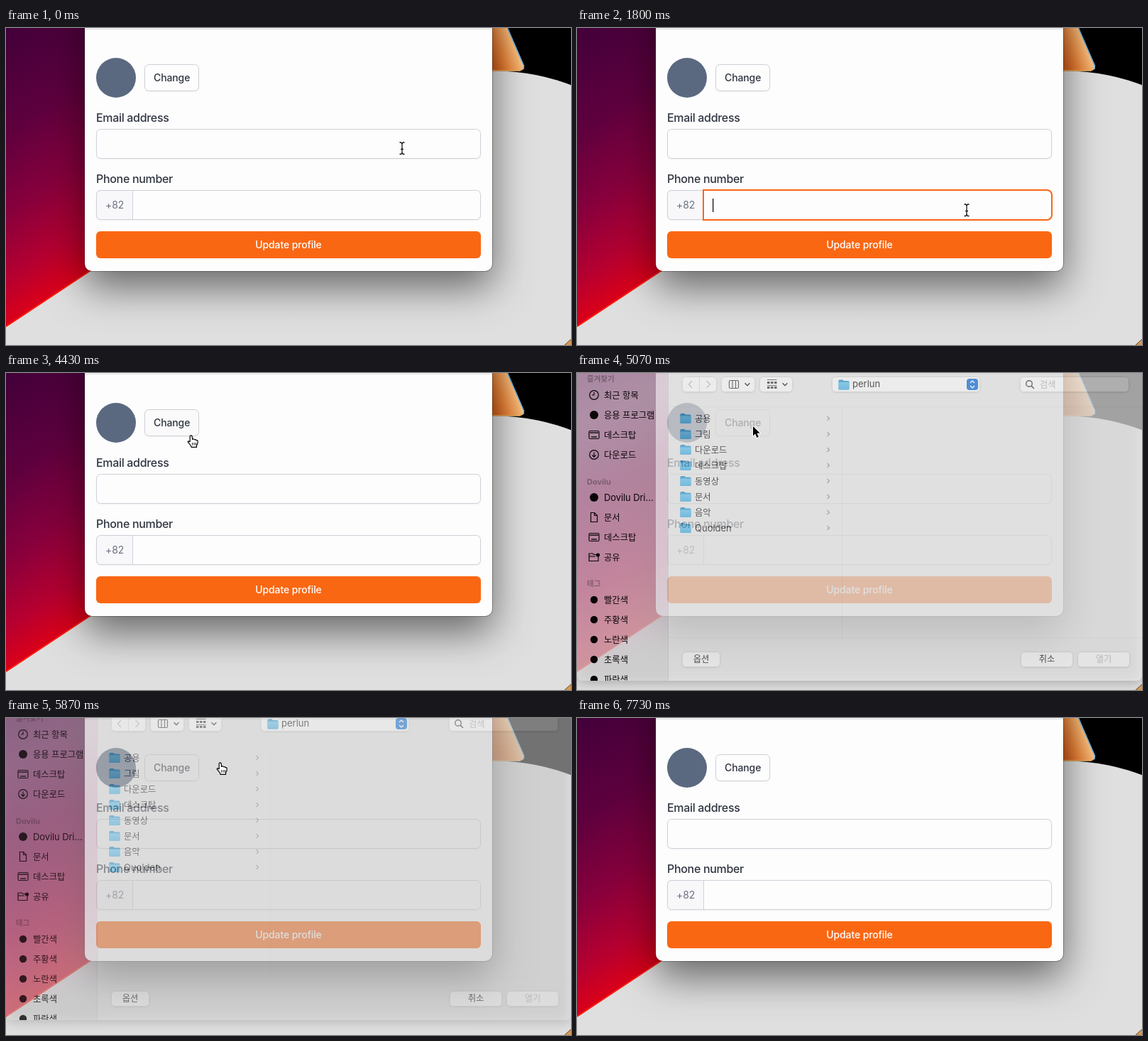
These frames come from a looping animation (796x446 px, 7760 ms). An HTML page with a canvas:

```html
<!DOCTYPE html>
<html lang="ko">
<head>
<meta charset="utf-8">
<title>Profile form</title>
<style>
html, body { margin: 0; width: 100%; height: 100%; overflow: hidden; background: #dfdfdf; }
canvas { display: block; width: 796px; height: 446px; }
</style>
</head>
<body>
<canvas id="stage" width="796" height="446"></canvas>
<script>
const W = 796, H = 446, LOOP = 7760;
const FONT = 'Inter, "Noto Sans CJK KR", "Noto Sans CJK", sans-serif';
const ORANGE = '#fa6713', BLUE = '#1478d8', INK = '#262626';
const screen = document.getElementById('stage').getContext('2d');
const layer = document.createElement('canvas');
layer.width = W; layer.height = H;
const sheet = layer.getContext('2d');
let g = screen;

const clamp = v => Math.max(0, Math.min(1, v));
const ease = v => v * v * (3 - 2 * v);
const during = (t, a, b) => t >= a && t < b;

function fill(color) { g.fillStyle = color; g.fill(); }
function stroke(color, width = 1) { g.strokeStyle = color; g.lineWidth = width; g.stroke(); }
function rect(x, y, w, h, color) { g.fillStyle = color; g.fillRect(x, y, w, h); }
function round(x, y, w, h, r) { g.beginPath(); g.roundRect(x, y, w, h, r); }
function poly(points, close) {
  g.beginPath();
  points.forEach(([x, y]) => g.lineTo(x, y));
  if (close) g.closePath();
}
function line(color, width, ...points) { poly(points); stroke(color, width); }
function disc(x, y, r, color) { g.beginPath(); g.arc(x, y, r, 0, 7); fill(color); }
function ring(x, y, r, color, width = 1.2) { g.beginPath(); g.arc(x, y, r, 0, 7); stroke(color, width); }
function gradient(x0, y0, x1, y1, stops) {
  const gr = g.createLinearGradient(x0, y0, x1, y1);
  stops.forEach(([at, c]) => gr.addColorStop(at, c));
  return gr;
}
function text(str, x, y, size, color, { weight = 400, space = 0, align = 'left' } = {}) {
  g.font = `${weight} ${size}px ${FONT}`;
  g.letterSpacing = space + 'px';
  g.textAlign = align;
  g.textBaseline = 'alphabetic';
  g.fillStyle = color;
  g.fillText(str, x, y);
}
function shadow(color, blur, y) { g.shadowColor = color; g.shadowBlur = blur; g.shadowOffsetY = y; }
function noShadow() { shadow('transparent', 0, 0); }

function wallpaper() {
  rect(0, 0, W, H, '#dfdfdf');
  poly([[0, 0], [640, 0], [0, 420]], true);
  fill(gradient(0, 0, 194, 293, [[0, '#42003a'], [.35, '#5e003e'], [.62, '#86003c'],
    [.85, '#b60030'], [1, '#dc0018']]));
  line('#ff1c10', 2, [0, 420], [130, 334]);

  rect(600, 0, 196, 120, '#000');
  disc(690, 355, 294.5, '#dfdfdf');
  g.beginPath();
  g.moveTo(670, 0); g.lineTo(706, 0); g.lineTo(729, 53);
  g.quadraticCurveTo(731, 60, 724, 60);
  g.lineTo(670, 60);
  g.closePath();
  fill(gradient(684, 40, 725, 24, [[0, '#d9641f'], [.35, '#ec873c'], [.75, '#f7b673'], [1, '#fff0cf']]));
  line('#6fb9e8', 1.5, [706.5, 0], [729.5, 53], [729, 58]);
  line('#f3b565', 1.5, [680, 60], [725, 60]);
  poly([[796, 438], [796, 446], [787, 446]], true);
  fill('#d99a4e');
  line('#5b4632', 1, [796, 438], [787, 446]);
}

function field(x, y, w, h, r, color = '#fdfdfd') {
  shadow('rgba(0,0,0,.07)', 2, 1);
  round(x + .5, y + .5, w - 1, h - 1, r);
  fill(color);
  noShadow();
  stroke('#cfd0d9');
}

function focusRing(x, y, w, h, r) {
  round(x + 1, y + 1, w - 2, h - 2, r);
  fill('#fdfdfd');
  stroke(ORANGE, 2);
}

function caret(x, y, age) {
  if (age % 1000 < 500) rect(x, y, 1.3, 19, '#111');
}

function form(t, hover) {
  shadow('rgba(0,0,0,.55)', 56, 22);
  round(111, -60, 574, 402, 10);
  fill('#fdfdfd');
  noShadow();
  round(110.5, -60, 575, 402.5, 10.5);
  stroke('rgba(0,0,0,.28)');
  rect(111, 1, 574, 1, '#d9d9dc');

  disc(155, 70, 28, '#5a6980');
  field(195, 51, 77, 38, 6, hover === 'change' ? '#fafafb' : '#fdfdfd');
  text('Change', 208, 75, 14, '#2f3541', { weight: 500, space: -.12 });

  const label = { weight: 500, space: -.32 };
  text('Email address', 127, 132, 16, '#2f3541', label);
  field(127, 142, 542, 42, 6);
  if (during(t, 500, 1600)) {
    focusRing(126, 141, 544, 44, 7);
    caret(139.5, 154, t - 500);
  }

  text('Phone number', 127, 218, 16, '#2f3541', label);
  field(127, 228, 542, 42, 6);
  round(127.5, 228.5, 51, 41, [6, 0, 0, 6]);
  fill('#f8f8fa');
  stroke('#cfd0d9');
  text('+82', 140, 254, 14, '#6b7080', { space: -.1 });
  if (during(t, 1600, 2900)) {
    focusRing(177, 227, 493, 44, [0, 7, 7, 0]);
    caret(191, 240, t - 1600);
  }

  if (during(t, 2900, 3700)) {
    round(124, 283, 548, 44, 8);
    stroke(ORANGE, 2);
  }
  round(127, 286, 542, 38, 6);
  fill(hover === 'update' ? '#e64b0d' : ORANGE);
  text('Update profile', 398, 310, 14, '#fff', { weight: 500, space: -.12, align: 'center' });
}

function folder(x, y) {
  round(x - 7.5, y - 7, 7, 5, 1.5);
  fill('#2f93c9');
  round(x - 7.5, y - 5.5, 15, 12.5, 1.5);
  fill('#3aa0d6');
  round(x - 7.5, y - 3.5, 15, 10.5, 1.5);
  fill(gradient(0, y - 4, 0, y + 7, [[0, '#70cbf4'], [1, '#4fb5e8']]));
}

function pill(x, y, w, h = 22) {
  shadow('rgba(0,0,0,.16)', 2, .5);
  round(x, y, w, h, 5.5);
  fill('#fff');
  noShadow();
  round(x + .5, y + .5, w - 1, h - 1, 5);
  stroke('#dcdcdc');
}

function chevron(x, y, dx, dy, color, width = 1.3) {
  line(color, width, [x - dx - dy, y - dy - dx], [x + dx * .6, y + dy * .6],
    dx ? [x - dx, y + dx] : [x - dy * -1, y - dy]);
}
function right(x, y, s, color, w = 1.2) { line(color, w, [x - s / 2, y - s], [x + s / 2, y], [x - s / 2, y + s]); }
function down(x, y, s, color, w = 1.6) { line(color, w, [x - s, y - s / 2], [x, y + s / 2], [x + s, y - s / 2]); }

const icons = {
  clock(x, y, c) { ring(x, y, 6.3, c); line(c, 1.2, [x, y - 4], [x, y], [x - 3, y]); },
  dot(x, y, c) { disc(x, y, 6, c); },
  desk(x, y, c) {
    round(x - 7, y - 5.5, 14, 11, 1.5); stroke(c, 1.2);
    line(c, 1.4, [x - 6, y - 3], [x + 6, y - 3]);
    line(c, 1.4, [x - 4, y + 3], [x + 4, y + 3]);
  },
  get(x, y, c) {
    ring(x, y, 6.3, c);
    line(c, 1.2, [x, y - 3.5], [x, y + 3]);
    line(c, 1.2, [x - 2.6, y + .5], [x, y + 3.2], [x + 2.6, y + .5]);
  },
  page(x, y, c) {
    poly([[x - 4.5, y - 6.5], [x + .5, y - 6.5], [x + 4.5, y - 2.5], [x + 4.5, y + 6.5], [x - 4.5, y + 6.5]], true);
    stroke(c, 1.2);
    line(c, 1.1, [x + .5, y - 6.5], [x + .5, y - 2.5], [x + 4.5, y - 2.5]);
  },
  share(x, y, c) {
    poly([[x - 7, y - 5], [x - 2, y - 5], [x, y - 3.5], [x + 6, y - 3.5], [x + 6, y + 5.5], [x - 7, y + 5.5]], true);
    stroke(c, 1.2);
    line(c, 1.1, [x - 7, y - 1], [x + 2, y - 1]);
    disc(x + 5.5, y - 3, 2.6, c);
  }
};

const places = [
  ['최근 항목', 44, 'clock'], ['응용 프로그램', 72, 'dot'], ['데스크탑', 100, 'desk'], ['다운로드', 128, 'get'],
  ['Dovilu Dri…', 188, 'dot'], ['문서', 216, 'page'], ['데스크탑', 244, 'desk'], ['공유', 272, 'share']
];
const tags = [['빨간색', '#e8261d'], ['주황색', '#e0721c'], ['노란색', '#eda532'], ['초록색', '#3cb02a'], ['파란색', '#1672e0']];
const files = ['공용', '그림', '다운로드', '데스크탑', '동영상', '문서', '음악', 'Quolden'];

function sideItems(dark) {
  const head = { weight: 700 }, tone = dark ? 'rgba(0,0,0,.3)' : '#9c7890';
  text('즐겨찾기', 14, 25, 10.5, tone, head);
  text('Dovilu', 14, 170, 11, tone, head);
  text('태그', 14, 313, 10.5, tone, head);
  for (const [name, y, icon] of places) {
    icons[icon](24, y, dark ? '#0a0508' : BLUE);
    text(name, 38, y + 4.5, name[0] === 'D' ? 13 : 12.3, dark ? '#0a0508' : INK, { space: name[0] === 'D' ? -.1 : 0 });
  }
  tags.forEach(([name, color], i) => {
    const y = 332 + 28 * i;
    disc(24, y, 5.2, dark ? '#0a0508' : color);
    text(name, 38, y + 4.5, 12.3, dark ? '#0a0508' : INK);
  });
}

function picker(show) {
  const v = Math.round(253 - 46 * (1 - show));
  g.clearRect(0, 0, W, H);
  g.save();
  round(0, 0, W, H, 8);
  g.clip();
  rect(128, 0, W - 128, H, `rgb(${v},${v},${v})`);
  rect(0, 0, 128, H, gradient(0, 0, 190, 460, [[0, '#dcc3d4'], [.16, '#e5d2df'], [.36, '#dfc0d2'],
    [.6, '#e3c3d3'], [.74, '#e2d3dc'], [.84, '#dededf'], [1, '#dcdcde']]));
  rect(128, 0, 1, H, '#d4ccd1');
  rect(129, 60, W, 1, '#e3e3e3');
  rect(129, 385, W, 1, '#e3e3e3');
  rect(373, 61, 1, 324, '#e3e3e3');

  pill(148, 18, 49);
  rect(172, 19, 1, 20, '#dcdcdc');
  line('#bdbdbd', 1.3, [162, 24], [157.5, 29], [162, 34]);
  right(185, 29, 5, '#bdbdbd', 1.3);
  pill(203, 18, 48);
  round(214.5, 23.5, 13, 11, 1.5); stroke('#444', 1.2);
  line('#444', 1.1, [219, 24], [219, 34]);
  line('#444', 1.1, [223.5, 24], [223.5, 34]);
  down(240, 29, 3.4, '#333');
  pill(257, 18, 47);
  for (let i = 0; i < 6; i++) {
    const x = 268 + i % 3 * 5, y = i < 3 ? 25 : 32;
    rect(x, y, 3.5, 3, '#444');
  }
  rect(268, 22, 13.5, 1, '#555');
  rect(268, 30, 13.5, 1, '#555');
  down(293, 29, 3.4, '#333');

  pill(359, 18, 209);
  folder(376, 29.5);
  text('perlun', 388, 33, 13, INK);
  round(549, 21, 16, 16, 4);
  fill('#1676dd');
  line('#fff', 1.5, [554, 27], [557, 24], [560, 27]);
  line('#fff', 1.5, [554, 31], [557, 34], [560, 31]);
  pill(624, 18, 154);
  ring(637, 28, 4.3, '#444', 1.4);
  line('#444', 1.6, [640, 31.2], [644, 35]);
  text('검색', 652, 33.5, 12.3, '#b5b5b5');

  files.forEach((name, i) => {
    const y = 77 + 22 * i;
    folder(153, y);
    text(name, 166, y + 4.5, i === 7 ? 13 : 12.3, INK);
    right(354, y, 3, '#999');
  });

  [['옵션', 148, 54, INK], ['취소', 625, 74, INK], ['열기', 705, 74, '#bcbcbc']].forEach(([name, x, w, c]) => {
    pill(x, 405, w);
    text(name, x + w / 2, 420, 12.3, c, { align: 'center' });
  });
  if (show === 1) sideItems(false);
  g.restore();
}

function overlay(show) {
  g = sheet;
  picker(show);
  g = screen;
  const dy = Math.round(-42 * (1 - show));
  g.save();
  if (show < 1) {
    g.globalAlpha = show;
    shadow('rgba(0,0,0,.35)', 16, 3);
  } else rect(0, 0, W, H, '#7d3a52');
  g.drawImage(layer, 0, dy);
  noShadow();
  if (show < 1) {
    g.globalAlpha = Math.min(1, show * 1.6);
    g.beginPath();
    g.rect(0, dy, 128, H);
    g.clip();
    g.translate(0, dy);
    sideItems(true);
  }
  g.restore();
}

// time, x, y of the pointer's hot spot
const path = [[0, 558, 169], [1100, 558, 169], [1500, 549, 256], [2300, 549, 256], [2800, 534, 304], [3500, 534, 304],
  [4430, 261, 88], [4700, 248, 75], [5600, 248, 75], [5870, 302, 63], [6700, 830, 200], [LOOP, 830, 200]];

function pointerAt(t) {
  const i = path.findIndex(p => p[0] > t);
  const [t0, x0, y0] = path[i - 1], [t1, x1, y1] = path[i];
  const k = ease((t - t0) / (t1 - t0));
  return [x0 + (x1 - x0) * k, y0 + (y1 - y0) * k];
}

function zone(x, y) {
  const inside = (a, b, c, d) => x >= a && x <= c && y >= b && y <= d;
  if (inside(195, 51, 272, 89)) return 'change';
  if (inside(127, 286, 669, 324)) return 'update';
  if (inside(127, 142, 669, 184) || inside(179, 228, 669, 270)) return 'input';
  return '';
}

function beam() {
  for (const [c, w] of [['#fff', 3], ['#111', 1.3]]) {
    line(c, w, [0, -7], [0, 7.5]);
    line(c, w, [-3.5, -8], [-1.5, -8], [0, -6.5], [1.5, -8], [3.5, -8]);
    line(c, w, [-3.5, 8.5], [-1.5, 8.5], [0, 7], [1.5, 8.5], [3.5, 8.5]);
    line(c, w, [-2, 1.5], [2, 1.5]);
  }
}

function arrow() {
  poly([[0, 0], [0, 13.5], [3.1, 10.6], [5.4, 16], [7.8, 15], [5.5, 9.8], [9.6, 9.6]], true);
  g.lineJoin = 'round';
  stroke('#fff', 2.2);
  fill('#000');
}

function hand() {
  g.beginPath();
  g.moveTo(-1.8, 9);
  g.lineTo(-1.8, 1);
  g.quadraticCurveTo(-.2, -1.3, 1.2, 1);
  g.lineTo(1.6, 5.2);
  g.quadraticCurveTo(3.4, 4, 4.4, 5.8);
  g.quadraticCurveTo(6.2, 4.9, 7, 6.7);
  g.quadraticCurveTo(9.2, 6, 9.2, 8.5);
  g.quadraticCurveTo(9.4, 12, 7.6, 13.6);
  g.lineTo(7.5, 16.3);
  g.lineTo(.2, 16.3);
  g.quadraticCurveTo(-.4, 13.6, -4.6, 9.4);
  g.quadraticCurveTo(-5, 6.6, -1.8, 9);
  fill('#fff');
  stroke('#000', 1.2);
  for (const x of [1.7, 4.1, 6.4]) line('#000', .9, [x, 10], [x, 13.6]);
}

function draw(t) {
  const [x, y] = pointerAt(t);
  const show = clamp((t - 4900) / 250) * (1 - clamp((t - 5745) / 250));
  const open = during(t, 4900, 5745);
  const spot = open ? '' : zone(x, y);
  wallpaper();
  form(t, spot);
  if (show > 0) overlay(show);

  g.save();
  g.translate(x, y);
  if (spot === 'input') beam();
  else if (spot || during(t, 5745, 5960)) hand();
  else arrow();
  g.restore();
}

function tick() {
  draw(performance.now() % LOOP);
  requestAnimationFrame(tick);
}
tick();
</script>
</body>
</html>
```
